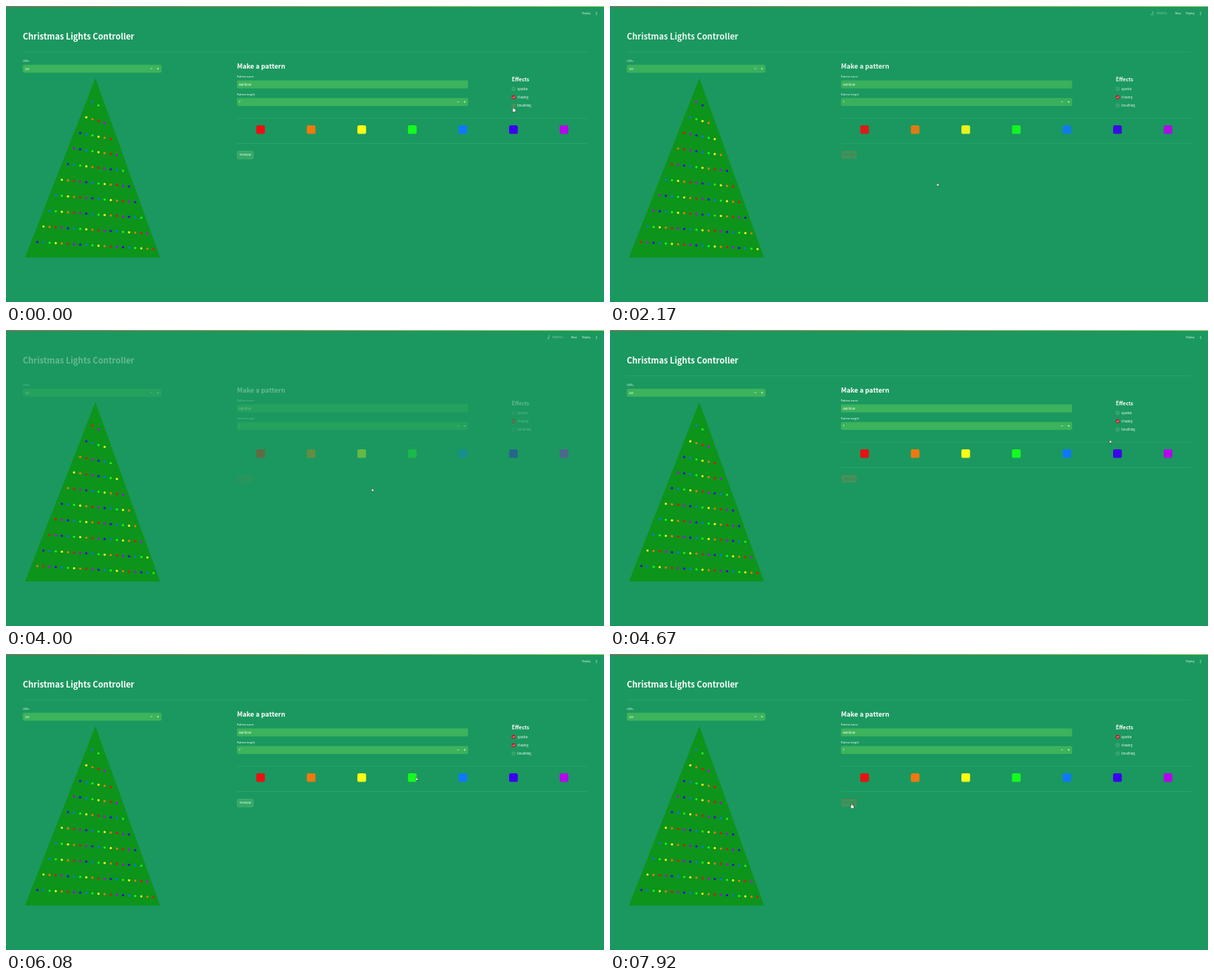
An HTML page with a canvas that plays this animation: 800 by 397 pixels, repeating every 8000 ms.

```html
<!DOCTYPE html>
<html lang="en">
<head>
<meta charset="utf-8">
<title>Christmas Lights Controller</title>
<style>
html, body { margin: 0; width: 100%; height: 100%; overflow: hidden; background: #1b985f; }
canvas { display: block; width: 800px; height: 397px; }
</style>
</head>
<body>
<canvas id="stage"></canvas>
<script>
const W = 800, H = 397, LOOP = 8000, FPS = 12;
const FONT = '"Noto Sans CJK JP", "Noto Sans CJK SC", "Noto Sans CJK", Lato, sans-serif';
const BG = '#1b985f', FIELD = '#3cb35c', RULE = 'rgba(255,255,255,0.1)';
const COLORS = ['#ea1012', '#f0780f', '#fcfb16', '#14fb20', '#0f78fa', '#3a00ee', '#b404ee'];

const RUN = { start: 1420, chase: 1600, step: 235, end: 4400 };
const SPARKLE_ON = 5000, CHASING_OFF = 7200;

// Pointer moves: start, end, and where the tip comes to rest
const HOME = [679, 136];
const MOVES = [
  [150, 680, 322.5, 206],
  [1400, 2100, 437.5, 237.5],
  [2450, 3500, 489.5, 212.5],
  [4200, 4670, 668.5, 147.5],
  [4670, 4870, 679, 113],
  [5550, 6080, 548.5, 165.5],
  [6080, 6500, 324, 205],
  [6620, 7060, 679, 124],
  [7450, 7880, 323.5, 201]
];

const canvas = document.getElementById('stage');
const ratio = window.devicePixelRatio || 1;
canvas.width = W * ratio;
canvas.height = H * ratio;
const ctx = canvas.getContext('2d');

const clamp = v => Math.min(1, Math.max(0, v));
const smooth = u => u * u * (3 - 2 * u);

// Set large and scaled down evenly, so small type keeps its exact spacing.
function text(str, x, y, size, weight = 400, color = '#fff') {
  ctx.save();
  ctx.translate(x, y);
  ctx.scale(0.1, 0.1);
  ctx.font = `${weight} ${size * 10}px ${FONT}`;
  ctx.fillStyle = color;
  ctx.fillText(str, 0, 0);
  ctx.restore();
}

function box(x, y, w, h, r, fill, stroke, line = 0.5) {
  ctx.beginPath();
  ctx.roundRect(x, y, w, h, r);
  ctx.fillStyle = fill;
  ctx.fill();
  if (!stroke) return;
  ctx.strokeStyle = stroke;
  ctx.lineWidth = line;
  ctx.stroke();
}

function trace(points) {
  ctx.beginPath();
  for (const [x, y] of points) ctx.lineTo(x, y);
}

function line(points, color, width) {
  trace(points);
  ctx.strokeStyle = color;
  ctx.lineWidth = width;
  ctx.stroke();
}

function dot(x, y, r, color) {
  ctx.beginPath();
  ctx.arc(x, y, r, 0, 7);
  ctx.fillStyle = color;
  ctx.fill();
}

function rule(x, y) {
  ctx.fillStyle = RULE;
  ctx.fillRect(x, y, 778 - x, 0.7);
}

function pointer(t) {
  let [x, y] = HOME;
  for (const [start, end, toX, toY] of MOVES) {
    const u = smooth(clamp((t - start) / (end - start)));
    x += (toX - x) * u;
    y += (toY - y) * u;
  }
  return { x, y };
}

const inside = (p, x, y, w, h) => p.x >= x && p.x <= x + w && p.y >= y && p.y <= y + h;
const onButton = p => inside(p, 309, 194, 22, 13);
const onCheckbox = (p, y) => inside(p, 676, y - 5, 28, 10);

function field(label, value, x, y, w, stepper) {
  text(label, x, y - 3.6, 3.6);
  box(x, y, w, 10.7, 2, FIELD);
  text(value, x + 2.4, y + 6.9, 4.03);
  if (!stepper) return;
  const minus = x + w - 13.5, plus = x + w - 4.7, mid = y + 5.2;
  for (const s of [minus, plus]) line([[s - 1.2, mid], [s + 1.2, mid]], '#fff', 0.6);
  line([[plus, mid - 1.2], [plus, mid + 1.2]], '#fff', 0.6);
}

function checkbox(label, y, on, hover) {
  const edge = hover ? '#d8503c' : 'rgba(255,255,255,0.25)';
  box(676.9, y - 2.2, 4.4, 4.4, 1, on ? '#c8142a' : '#2aa263', on ? '#c8142a' : edge);
  if (on) line([[677.9, y], [678.8, y + 1], [680.5, y - 1]], '#fff', 0.8);
  text(label, 684.3, y + 1.4, 4.03);
}

function button(active) {
  if (active) box(310.6, 195.4, 18.6, 8.4, 0.6, '#2f9a5e', '#a8704e', 0.7);
  else box(309.2, 194.6, 21.8, 10.6, 2, '#36a866', 'rgba(255,255,255,0.2)');
  text('Preview', 312.6, 201.3, 4.03, 400, active ? '#7c6845' : '#fff');
}

function tree(shift) {
  trace([[119.6, 96.8], [206, 337.2], [25.4, 337.2]]);
  ctx.fillStyle = '#0c941b';
  ctx.fill();
  let k = 0;
  for (let row = 0; row < 10; row++) {
    const n = 2 * (row + 1);
    for (let i = 0; i < n; i++, k++) {
      const x = 115.6 + 8.18 * (i - row), y = 128.3 + 20.92 * row + 10 * i / n;
      dot(x, y, 1.5, COLORS[(116 + shift - k) % 7]);
    }
  }
}

function header(t, busy) {
  const bar = ctx.createLinearGradient(0, 0, W, 0);
  bar.addColorStop(0, '#ff4b4b');
  bar.addColorStop(1, '#fffd80');
  ctx.fillStyle = bar;
  ctx.fillRect(0, 0, W, 0.7);
  text('Deploy', 770.5, 11.4, 3.55);
  for (let i = -1; i <= 1; i++) dot(790, 10 + 1.6 * i, 0.5, '#fff');
  if (!busy) return;
  text('Stop', 756, 11.4, 3.55);
  const pale = 'rgba(255,255,255,0.5)';
  text('RUNNING...', 731, 11.3, 3.05, 400, pale);
  const swing = Math.sin(t / 80);
  dot(726.6, 8, 0.7, pale);
  line([[726.2, 8.8], [725.3, 10.6], [726.4 + swing, 12.6]], pale, 0.7);
  line([[725.3, 10.6], [724 - swing, 12.2]], pale, 0.7);
}

function page(t, p) {
  text('Christmas Lights Controller', 22.5, 44.5, 11.05, 700);
  rule(22.5, 61);
  field('LEDs:', '100', 22.5, 78.8, 185.5, true);

  text('Make a pattern', 309, 84.2, 8.85, 700);
  field('Pattern name', 'Rainbow', 309, 99.7, 309.3);
  field('Pattern length', '7', 309, 123.4, 309.3, true);

  text('Effects', 676.8, 101.4, 7, 700);
  const effects = { sparkle: t >= SPARKLE_ON, chasing: t < CHASING_OFF, breathing: false };
  Object.entries(effects).forEach(([name, on], i) => {
    const y = 111.1 + 11.2 * i;
    checkbox(name, y, on, onCheckbox(p, y));
  });

  rule(309, 150.2);
  COLORS.forEach((c, i) => box(334.8 + 67.65 * i, 160, 11.6, 11.6, 2.2, c));
  rule(309, 184.2);

  const focused = t >= RUN.start && t < SPARKLE_ON;
  button(focused || onButton(p));
}

function cursor({ x, y }, hand) {
  ctx.beginPath();
  if (hand) {
    ctx.roundRect(x - 0.5, y, 1, 4, 0.5);
    ctx.roundRect(x - 1.3, y + 2.3, 3.9, 3.4, 1);
  } else {
    trace([[x, y], [x, y + 4.4], [x + 1.2, y + 3.6], [x + 3.1, y + 3.1]]);
    ctx.closePath();
  }
  ctx.lineWidth = 0.9;
  ctx.strokeStyle = '#102018';
  ctx.stroke();
  ctx.fillStyle = '#fff';
  ctx.fill();
}

function draw(t) {
  const p = pointer(t);
  const running = t >= RUN.start && t < RUN.end;
  const fade = running ? clamp((t - RUN.start - 500) / 1000) : 0;
  const chase = running ? Math.max(0, Math.floor((t - RUN.chase) / RUN.step)) : 0;

  ctx.setTransform(ratio, 0, 0, ratio, 0, 0);
  ctx.fillStyle = BG;
  ctx.fillRect(0, 0, W, H);
  header(t, running && t > RUN.start + 450);
  ctx.globalAlpha = 1 - 0.67 * Math.pow(fade, 1.5);
  page(t, p);
  ctx.globalAlpha = 1;
  tree(chase);
  cursor(p, onButton(p) || onCheckbox(p, 112) || onCheckbox(p, 122) || onCheckbox(p, 133));
}

let begin;
function loop(now) {
  if (begin === undefined) begin = now;
  const t = (now - begin) % LOOP;
  draw(Math.floor(t * FPS / 1000 + 0.1) * 1000 / FPS);
  requestAnimationFrame(loop);
}
draw(0);
requestAnimationFrame(loop);
</script>
</body>
</html>
```
